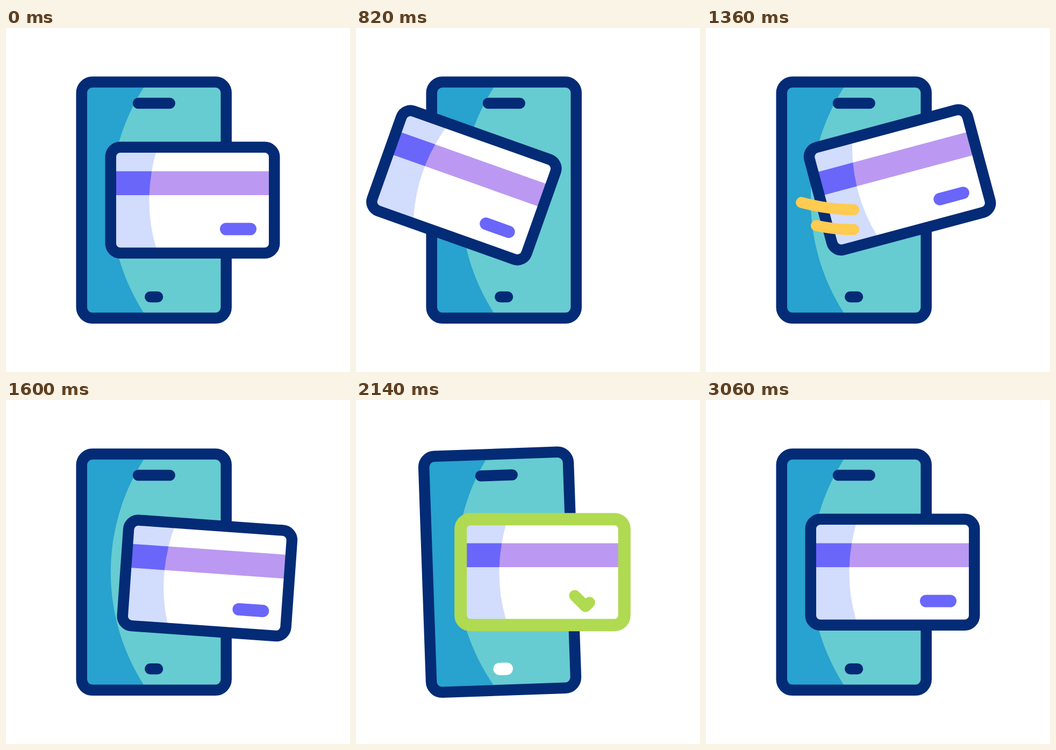
An HTML page for the animation above (3.2 s loop, 640 by 640 pixels).

```html
<!DOCTYPE html>
<html lang="en">
<head>
<meta charset="utf-8">
<title>Card payment</title>
<style>
  html, body { margin: 0; height: 100%; overflow: hidden; background: #fff; }
  svg { display: block; width: 100vw; height: 100vh; }
  .line { fill: none; stroke-linecap: round; stroke-linejoin: round; }
</style>
</head>
<body>
<svg viewBox="0 0 640 640">
  <g id="phone">
    <rect x="140.7" y="100.6" width="269" height="439.2" rx="20" fill="#66ccd1"/>
    <path d="M256 111A388.5 388.5 0 0 0 256 529.5L253 535H147V106H259Z" fill="#28a2ce"/>
    <rect x="140.7" y="100.6" width="269" height="439.2" rx="20" fill="none" stroke="#042b76" stroke-width="20.5"/>
    <path class="line" d="M246 140H304.7" stroke="#042b76" stroke-width="20.5"/>
    <path class="line" id="home" d="M268.3 500.2H282"/>
  </g>
  <g id="card">
    <rect x="194.7" y="221.7" width="304.6" height="197" rx="18" fill="#fff"/>
    <path d="M200 266.5H495V311H200Z" fill="#bb99f2"/>
    <path id="shade" d="M279 232A316 316 0 0 0 279 408.5V413H200V228H279Z" fill="#d2dcfd"/>
    <path d="M200 266.5H271.2A316 316 0 0 0 266.7 311H200Z" fill="#6a66fa"/>
    <rect id="edge" x="194.7" y="221.7" width="304.6" height="197" rx="18" fill="none"/>
    <path class="line" id="pill" d="M409.5 374H454.5" stroke="#6a66fa" stroke-width="23"/>
    <path class="line" id="check" pathLength="1" d="M407 364L427 384L467.3 344" stroke="#b0da51" stroke-width="21"/>
  </g>
  <g class="line" stroke="#ffcb50" stroke-width="20.5">
    <path id="swish1" pathLength="1" d="M100 296Q190 338 275 338"/>
    <path id="swish2" pathLength="1" d="M150 348Q205 375 275 375"/>
  </g>
</svg>
<script>
const LOOP = 3200;
const el = id => document.getElementById(id);

// Card swing: [start, end, angles, start point, control point, end point]
const swing = [
  [0, 900, 0, 20, [0, 0], [-88.6, 24.4], [-148.8, -30]],
  [900, 1400, 20, -15.6, [-148.8, -30], [-60, 44], [16.2, -40.5]],
  [1400, 1633, -15.6, 5.1, [16.2, -40.5], [29, -14], [27.2, 14]],
  [1633, 1980, 5.1, 0, [27.2, 14], [13.6, 7], [0, 0]]
];

const ease = (t, a, b) => {
  const x = Math.min(1, Math.max(0, (t - a) / (b - a)));
  return x * x * (3 - 2 * x);
};

function moveCard(t) {
  const [a, b, r0, r1, p, q, r] = swing.find(s => t < s[1]) || swing[3];
  const f = ease(t, a, b), g = 1 - f;
  const [x, y] = [0, 1].map(i => g * g * p[i] + 2 * f * g * q[i] + f * f * r[i]);
  el("card").setAttribute("transform",
    `translate(${x} ${y}) rotate(${r0 + (r1 - r0) * f} 347 320.2)`);
}

function shakePhone(t) {
  const start = 1955, step = 185, angles = [0, -2, 2, -2, 2, 0];
  let a = 0;
  for (let i = 1; i < angles.length; i++) {
    a += (angles[i] - angles[i - 1]) * ease(t, start + (i - 1) * step, start + i * step);
  }
  el("phone").setAttribute("transform", `rotate(${a} 275 540)`);
}

// Shows the part of a path between the fractions a and b
function trim(id, a, b) {
  const s = el(id).style;
  s.display = b - a > 0.001 ? "" : "none";
  s.strokeDasharray = `${b - a} 2`;
  s.strokeDashoffset = -a;
}

function paint(id, color, width) {
  el(id).setAttribute("stroke", color);
  el(id).setAttribute("stroke-width", width);
}

function draw(t) {
  const paid = t >= 1633 && t < 3050;
  const done = t >= 2000 && t < 3050;
  moveCard(t);
  shakePhone(t);
  paint("edge", paid ? "#b0da51" : "#042b76", paid ? 23 : 20.5);
  paint("home", paid ? "#fff" : "#042b76", paid ? 23 : 20.5);
  el("pill").style.display = done ? "none" : "";
  trim("check", 0, done ? ease(t, 2000, 2300) : 0);
  for (const id of ["swish1", "swish2"]) {
    trim(id, ease(t, 1220, 1520), ease(t, 1100, 1320));
  }
}

const begin = performance.now();
function tick() {
  draw((performance.now() - begin) % LOOP);
  requestAnimationFrame(tick);
}
tick();
</script>
</body>
</html>
```
